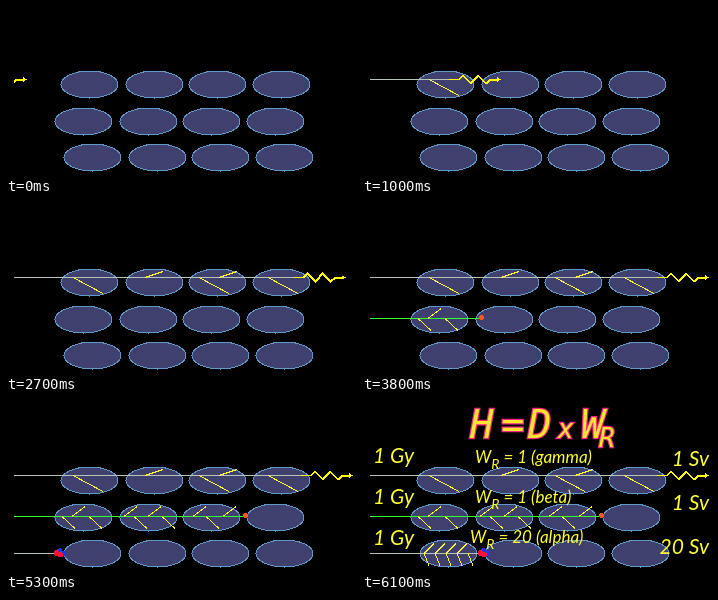
An HTML page that plays this animation: 350x170 px, repeating every 6200 ms.

```html
<!DOCTYPE html>
<html lang="en">
<head>
<meta charset="utf-8">
<title>Equivalent dose</title>
<style>
  html, body { margin: 0; width: 100%; height: 100%; overflow: hidden; background: #000; }
  svg { display: block; width: 350px; height: 170px; }
  .shapes { shape-rendering: crispEdges; fill: none; }
  .cell { fill: #40406e; stroke: #6098c8; }
  .ray { stroke: #b8c4b8; }
  .scratch { stroke: #ff3; }
  .wave { stroke: #ff0; stroke-width: 2; }
  .labels { fill: #ff3; font: italic 21px Lato, "Open Sans", sans-serif; }
  .small { font-size: 17px; }
  .small .sub { font-size: 14px; }
  .title { font: italic 39px "DejaVu Sans Mono", monospace; fill: #ffe430; stroke: #f0267e; stroke-width: 2.4; paint-order: stroke; }
  .title .sub { font-size: 26px; }
</style>
</head>
<body>
<svg viewBox="0 0 350 170">
  <defs><clipPath id="edge"><rect x="8" width="342" height="170"/></clipPath></defs>
  <g class="shapes">
    <g id="cells"></g>
    <path id="gammaRay" class="ray"/>
    <path id="betaRay" stroke="#3f3"/>
    <path id="alphaRay" class="ray"/>
    <g id="scratches"></g>
    <g clip-path="url(#edge)">
      <g id="gamma">
        <path class="wave" d="M-42 73.5L-38 69.5L-30 77.5L-23 69.5L-15 77.5L-10 73.5H-2"/>
        <path stroke="#ff0" d="M-52 73.5H-42"/>
        <path fill="#ff0" d="M-4 71L0 73.5L-4 76Z"/>
      </g>
    </g>
    <circle id="beta" cy="113.5" r="2.5" fill="#f52"/>
    <g id="alpha">
      <circle cx="0" cy="149" r="2.7" fill="#23e"/>
      <circle cx="-3.2" cy="151" r="2.7" fill="#f13"/>
      <circle cx="3.2" cy="151.5" r="2.7" fill="#23e"/>
      <circle cx="0.6" cy="152.8" r="2.7" fill="#f13"/>
    </g>
  </g>
  <g id="labels" class="labels">
    <g class="title">
      <text x="108" y="36">H</text>
      <text x="139" y="36">=</text>
      <text x="166" y="36">D</text>
      <text x="196" y="36" class="sub">x</text>
      <text x="219" y="36">W</text>
      <text x="237" y="45" class="sub">R</text>
    </g>
  </g>
</svg>
<script>
const LOOP = 6200, STEP = 100, LEFT = 8, LABELS_AT = 6100;
const $ = id => document.getElementById(id);

function add(parent, tag, attrs, text = '') {
  const el = document.createElementNS('http://www.w3.org/2000/svg', tag);
  for (const key in attrs) el.setAttribute(key, attrs[key]);
  el.textContent = text;
  return parent.appendChild(el);
}

// Each particle flies at constant speed (px/ms) and stops at `to`.
// Scratches alternate down and up along its ray, shown `lag` px after it passes.
const particles = {
  gamma: {
    start: 0, from: 21, to: 347, speed: 0.118, y: 73.5, tail: 52, lag: 45,
    hits: [67, 139, 193, 213, 262], down: [30, 16], up: [18, -6]
  },
  beta: {
    start: 2800, from: 12.5, to: 239.5, speed: 0.107, y: 114.5, tail: 0, lag: 12,
    hits: [56, 66, 83, 118, 128, 142, 156, 187, 200, 217], down: [13, 12], up: [13, -10]
  },
  alpha: {
    start: 4900, from: 15, to: 121.5, speed: 0.097, y: 151.5, tail: 0, lag: 4,
    hits: Array.from({ length: 9 }, (_, i) => 62 + 11 * (i >> 1)), down: [5, 12], up: [10, -10]
  }
};

const scratches = [];
for (const [id, p] of Object.entries(particles))
  p.hits.forEach((x, i) => {
    const [dx, dy] = i % 2 ? p.up : p.down;
    const line = { class: 'scratch', x1: x, y1: p.y, x2: x + dx, y2: p.y + dy };
    scratches.push({ id, at: x + p.lag, el: add($('scratches'), 'line', line) });
  });

for (const [left, cy] of [[83.5, 78.5], [77.5, 115.5], [86.5, 151.5]])
  for (let i = 0; i < 4; i++)
    add($('cells'), 'ellipse', { class: 'cell', cx: left + 64 * i + (i === 1), cy, rx: 28.5, ry: 13.5 });

const labels = $('labels');

function weight(x, y, rest) {
  const text = add(labels, 'text', { x, y, class: 'small' });
  add(text, 'tspan', {}, 'W');
  add(text, 'tspan', { class: 'sub', dy: 6 }, 'R');
  add(text, 'tspan', { dy: -6 }, ' = ' + rest);
}

['1 (gamma)', '1 (beta)', '20 (alpha)'].forEach((factor, i) => {
  const dose = factor.split(' ')[0] + ' Sv';
  add(labels, 'text', { x: 11, y: 61 + 41 * i }, '1 Gy');
  add(labels, 'text', { x: 347, y: 64 + 44 * i, 'text-anchor': 'end' }, dose);
  weight(i < 2 ? 113 : 108, 61 + 40 * i, factor);
});

const show = (el, on) => el.setAttribute('visibility', on ? 'visible' : 'hidden');

function draw(t) {
  const x = {};
  for (const [id, p] of Object.entries(particles)) {
    const on = t >= p.start;
    x[id] = on ? Math.min(p.to, p.from + p.speed * (t - p.start)) : 0;
    show($(id), on);
    $(id).setAttribute('transform', `translate(${x[id]} 0)`);
    const end = x[id] - p.tail;
    $(id + 'Ray').setAttribute('d', end > LEFT ? `M${LEFT} ${p.y}H${end}` : '');
  }
  for (const s of scratches) show(s.el, x[s.id] >= s.at);
  show(labels, t >= LABELS_AT);
}

const begin = performance.now();
function tick() {
  const t = (performance.now() - begin) % LOOP;
  draw(Math.floor(t / STEP) * STEP);
  requestAnimationFrame(tick);
}
tick();
</script>
</body>
</html>
```
